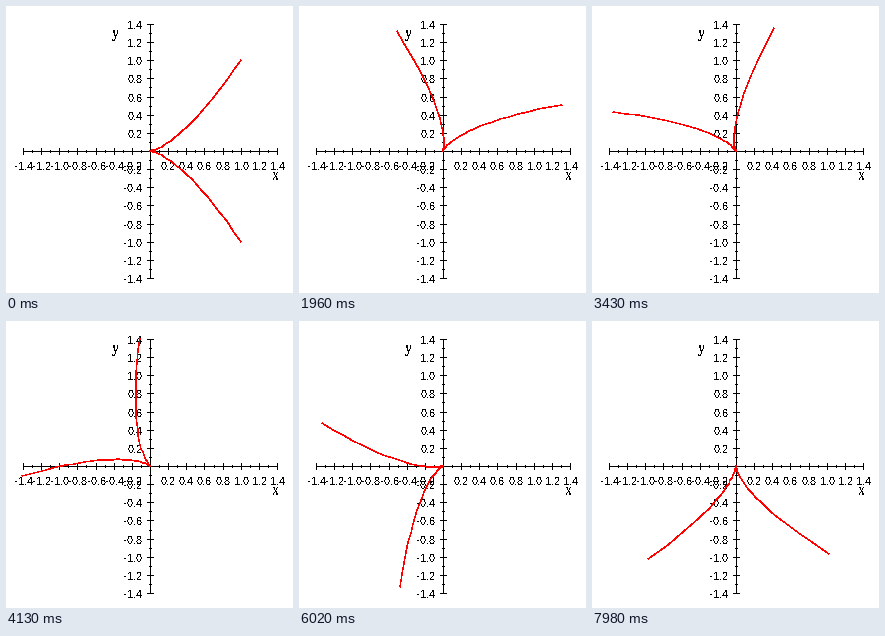
Write a matplotlib script that moves like this. It is 287 by 287 pixels and loops after 8 s.

```python
import numpy as np
import matplotlib.pyplot as plt
from matplotlib.animation import FuncAnimation

SIZE, DPI = 287, 64
PX = 72 / DPI                      # points per pixel
OX, OY, UNIT = 144.5, 145.5, 127 / 1.4
TICK_MS, LOOP_MS = 10, 8000
TURN = 2 * np.pi / 49
HAIRLINE = 0.4 * PX                # fills exactly the pixels it touches

plt.rcParams.update({
    "text.antialiased": False,
    "text.hinting": "default",
    "text.hinting_factor": 1,
    "lines.antialiased": False,
    "lines.linewidth": HAIRLINE,
    "lines.solid_capstyle": "butt",
    "path.simplify": False,
})

# every sixteenth pose is held a little longer
holds = [280 if i % 16 == 0 else 210 for i in range(40)]
starts = np.concatenate([[0], np.cumsum(holds)])

fig = plt.figure(figsize=(SIZE / DPI, SIZE / DPI), dpi=DPI, facecolor="white")
ax = fig.add_axes([0, 0, 1, 1])
ax.set_xlim(0, SIZE)
ax.set_ylim(SIZE, 0)
ax.axis("off")


def draw_axes():
    xs, ys = [], []

    def segment(x0, y0, x1, y1):
        xs.extend([x0, x1, np.nan])
        ys.extend([y0, y1, np.nan])

    segment(OX - 127.4, OY, OX + 127.4, OY)
    segment(OX, OY - 127.4, OX, OY + 127.4)
    for k in range(-14, 15):
        offset = round(k * UNIT / 10)
        reach = 1.4 if k % 2 else 3.4
        segment(OX + offset, OY - reach, OX + offset, OY + reach)
        segment(OX - reach, OY - offset, OX + reach, OY - offset)
    ax.plot(xs, ys, color="black", snap=False)


def draw_labels():
    style = dict(family="Liberation Sans", size=11 * PX, va="baseline")
    for k in range(-14, 15, 2):
        if k:
            offset = round(k * UNIT / 10)
            label = f"{k / 10:.1f}"
            ax.text(OX + offset, 164, label, ha="center", **style)
            ax.text(136.5, OY - offset + 4.5, label, ha="right", **style)
    serif = dict(family="Liberation Serif", size=16 * PX, ha="center", va="baseline")
    ax.text(269.5, 174, "x", **serif)
    ax.text(109.5, 32, "y", **serif)


draw_axes()
draw_labels()
# centred on pixel borders, so the stroke comes out two pixels wide
curve, = ax.plot([], [], color="#ff0000", zorder=5, snap=False)

t = np.linspace(-1, 1, 51)


def update(frame):
    pose = np.searchsorted(starts, frame * TICK_MS, side="right") - 1
    z = UNIT * (t**2 + 1j * t**3) * np.exp(1j * TURN * pose)
    curve.set_data(np.round(OX - 0.7 + z.real), np.round(OY - 0.7 - z.imag))
    return curve,


anim = FuncAnimation(fig, update, frames=LOOP_MS // TICK_MS, interval=TICK_MS,
                     repeat=True, repeat_delay=0)
plt.show()
```
